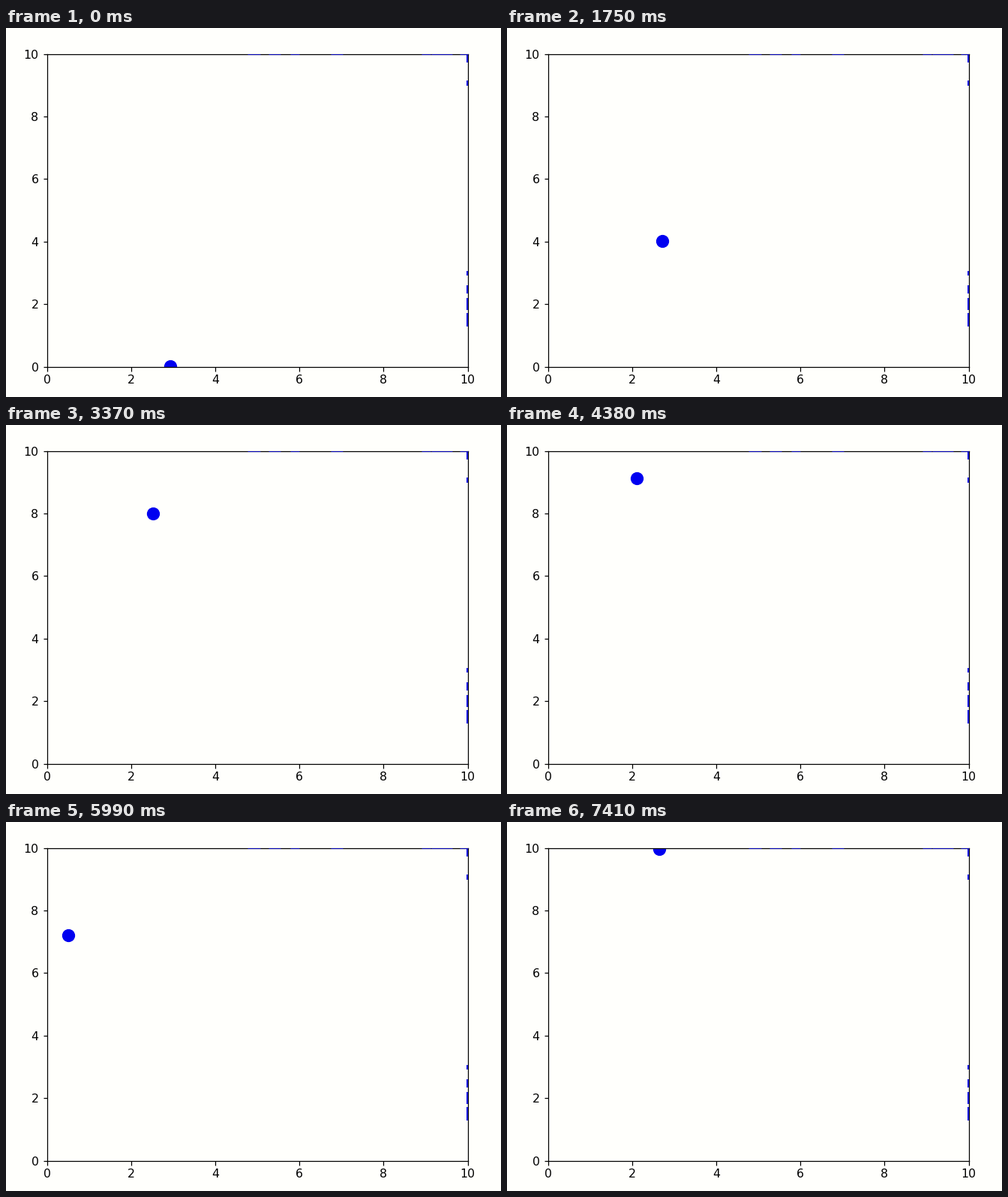
A matplotlib script that plays this animation: 660x492 px, repeating every 8000 ms.

```python
import matplotlib.pyplot as plt
from matplotlib.animation import FuncAnimation

W, H, DPI = 660, 492, 96
PT = 72 / DPI                      # points per pixel
INTERVAL, LOOP = 20, 8000          # ms
STEP = 201.7                       # ms between two moves of the ball
FIRST_MOVE = 141.5
BLUE, PAPER = "#0000f0", "#fffffc"

# Each leg: moves made, then the change in x and y per move.
# The ball rests for one move whenever it turns.
START = (2.93, 0.02)
LEGS = [(19, -0.0258, 0.4993),
        (7, -0.3195, -0.3835),
        (8, 0.3064, 0.394)]

# Traces along the top and right borders, as data ranges
TOP_MARKS = [(4.77, 5.07), (5.26, 5.55), (5.79, 5.99), (6.74, 7.03),
             (8.90, 9.12), (9.14, 9.64), (9.82, 10)]
RIGHT_MARKS = [(9.72, 9.97), (8.98, 9.15), (2.92, 3.06),
               (2.34, 2.61), (1.81, 2.19), (1.29, 1.72)]

plt.rcParams.update({"font.family": "DejaVu Sans", "toolbar": "None"})
fig = plt.figure(figsize=(W / DPI, H / DPI), dpi=DPI, facecolor=PAPER)
ax = fig.add_axes([54.5 / W, 40.5 / H, 561 / W, 417 / H], facecolor=PAPER)
ax.set(xlim=(0, 10), ylim=(0, 10), xticks=range(0, 11, 2), yticks=range(0, 11, 2))
ax.tick_params(labelsize=15.7 * PT, length=5.5 * PT, pad=5.5 * PT, width=1.25 * PT)
for spine in ax.spines.values():
    spine.set_linewidth(1.25 * PT)

for span in TOP_MARKS:
    ax.plot(span, (10, 10), color="#0000b8", lw=PT, zorder=3,
            solid_capstyle="butt", clip_on=False)
for span in RIGHT_MARKS:
    ax.plot((10, 10), span, color=BLUE, lw=4 * PT, zorder=2, solid_capstyle="butt")

ball, = ax.plot([], [], "o", color=BLUE, ms=15.7 * PT, mew=1.57 * PT, zorder=2)


def position(move):
    x, y = START
    for count, dx, dy in LEGS:
        done = min(max(move, 0), count)
        x, y = x + done * dx, y + done * dy
        move -= count + 1
    return x, y


def update(i):
    t = (i + 1) * INTERVAL
    x, y = position(int((t - FIRST_MOVE) // STEP))
    ball.set_data([x], [y])
    return ball,


anim = FuncAnimation(fig, update, frames=LOOP // INTERVAL, interval=INTERVAL,
                     repeat=True, repeat_delay=0, blit=False)
plt.show()
```
